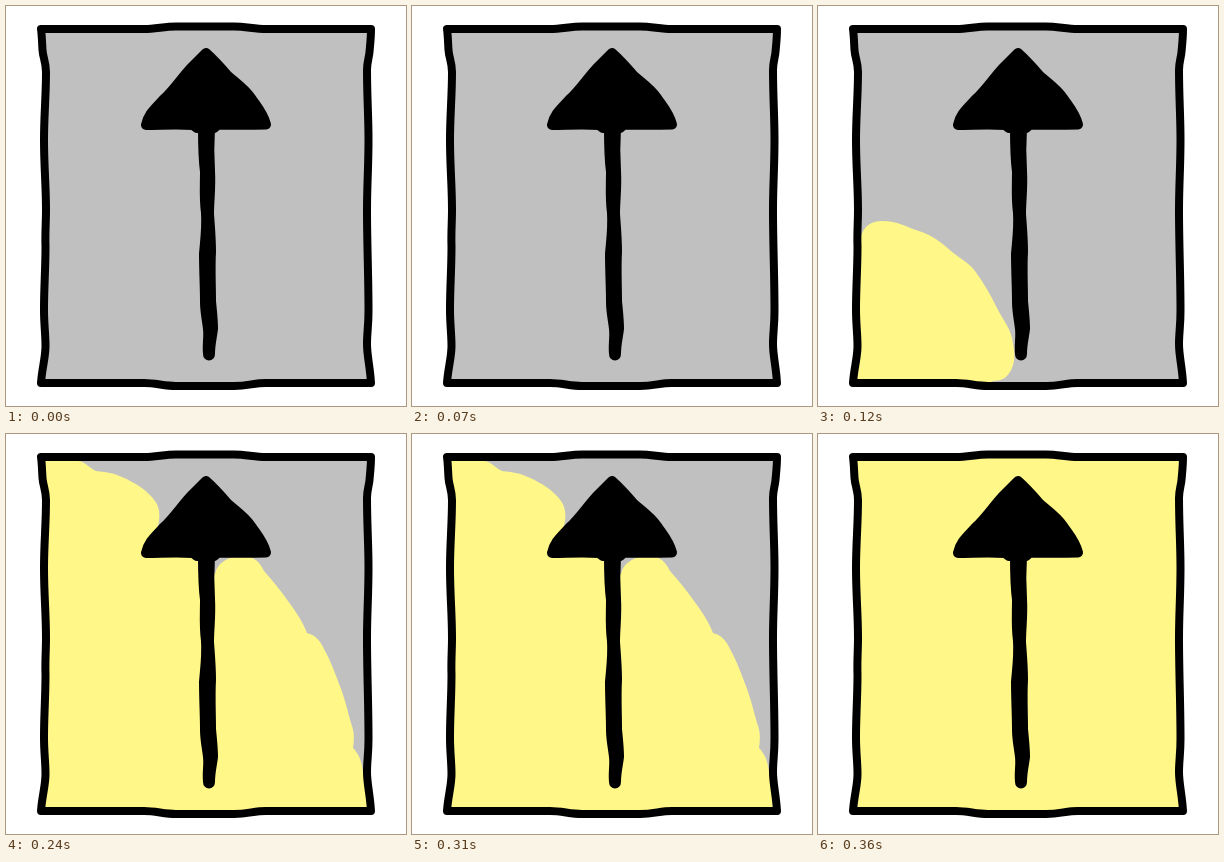
An HTML page for the animation above (480 ms loop, 400x400 px).

```html
<!DOCTYPE html>
<html lang="en">
<head>
<meta charset="utf-8">
<title>Filling panel</title>
<style>
  html, body { margin: 0; width: 100%; height: 100%; overflow: hidden; background: #fff; }
  svg { display: block; width: 100vw; height: 100vh; }
  .fill { fill: #fff788; visibility: hidden; }
  .ink { stroke: #000; stroke-linejoin: round; stroke-linecap: round; }
</style>
</head>
<body>
<svg viewBox="0 0 400 400">
  <defs>
    <path id="panel" d="M35 23 H138 C150 23 158 20.5 170 20.5 H228 C240 20.5 248 23 260 23 H365
      C365 32 364 40 363.500 46 C363 52 361 56 361 64 C361 90 362.500 110 362.500 134
      C362.500 160 361 180 361 204 C361 238 362.500 270 362.500 305
      C362.500 320 361 327 361 338 C361 350 364 360 365 377
      H260 C248 377 242 380 228 380 H170 C158 380 150 377 138 377 H35
      C36 362 39.500 352 39.500 340 C39.500 328 38 318 38 304
      C38 280 39.500 264 39.500 240 C39 228 40 216 40 204 C40 180 38 160 38 134
      C38 110 40 90 40 66 C40 56 37 52 36.500 44 C36 37 36 30 35 23 Z"/>
    <clipPath id="inside"><use href="#panel"/></clipPath>
  </defs>

  <use href="#panel" fill="#c0c0c0"/>
  <g clip-path="url(#inside)">
    <path class="fill" d="M30 380 V245 H41 C41 226 48 215 64 215 C80 215 88 221 101 225
      C114 229 124 237 133 245 C141 252 150 256 157 265 C166 277 173 290 179 302
      C185 314 194 324 195 338 C197 346 197 355 194 362 C190 371 185 375 175 375 L165 380 Z"/>
    <path class="fill" d="M30 380 V27 H72 C80 28 83 34 90 37 C99 38 108 39 116 43
      C130 49 142 57 149 67 C155 75 154 86 151 96 L170 122 H200 V140 H209
      C211 129 222 122 237 122 C249 122 254 129 258 137 C267 147 275 157 282 167
      C290 178 297 188 301 199 C309 201 314 206 318 215 C324 226 328 236 332 247
      C338 261 341 275 345 289 C349 299 348 306 347 314 C353 320 356 328 357 338
      L364 380 Z"/>
    <rect class="fill" x="30" y="15" width="340" height="370"/>
  </g>

  <g class="ink">
    <use href="#panel" fill="none" stroke-width="8"/>
    <path stroke-width="10" d="M200 47 C209 55 215 62 222 70 C230 77 239 83 245 92
      C251 101 257 107 260 118.500 C244 119 230 119 212 118.500 L208 122 H191 L187 119
      C170 118 155 119 140 119 C142 108 150 102 157 94 C168 84 174 74 184 63 Z"/>
    <path stroke-width="4" d="M194 122 H207 C206 138 206 150 207 165 C208 183 206 194 206 208
      C207 222 208 232 208 246 C207 262 208 279 208 295 C209 306 210 314 210 323
      C209 332 207 338 207 348 C207 354 199 354 199 348 C198 338 200 331 199 323
      C198 314 196 306 196 296 C196 281 195 265 195 248 C196 235 198 222 197 207
      C195 193 196 179 196 166 C194 151 194 138 194 122 Z"/>
  </g>
</svg>
<script>
  const STEP = 120;
  const fills = [...document.querySelectorAll(".fill")];
  const start = performance.now();

  function draw(now) {
    const step = Math.floor(Math.max(0, now - start) / STEP) % (fills.length + 1);
    fills.forEach((fill, i) => {
      fill.style.visibility = i + 1 === step ? "visible" : "hidden";
    });
    requestAnimationFrame(draw);
  }
  draw(start);
</script>
</body>
</html>
```
